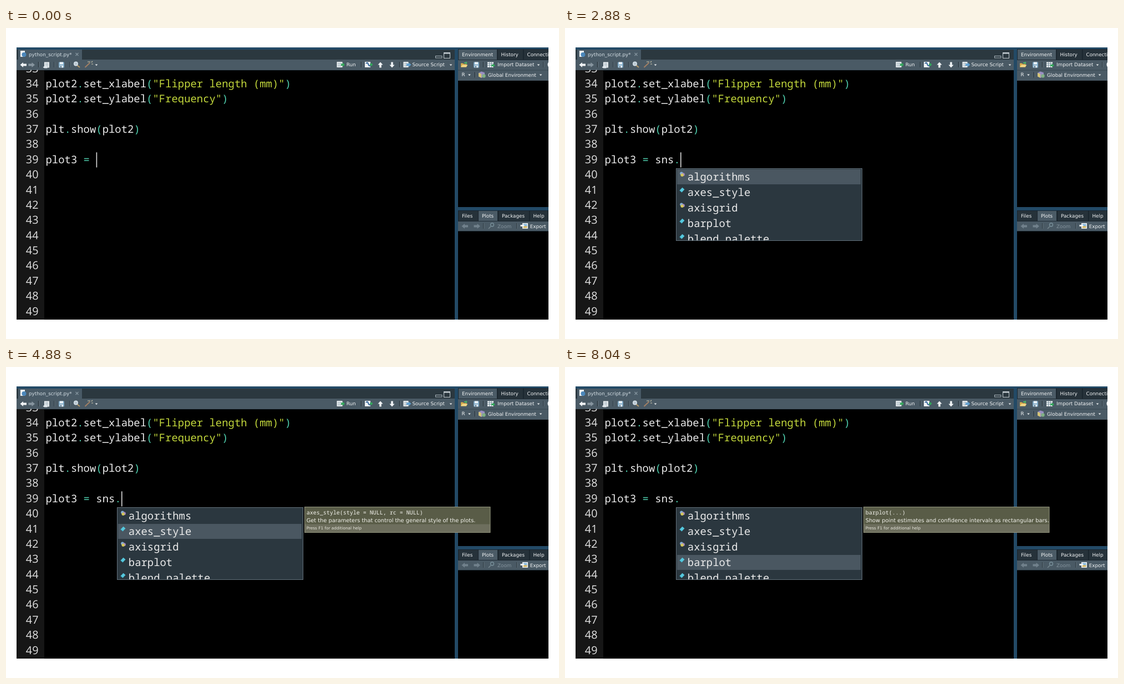
An HTML page that plays this animation: 997x561 px, repeating every 8560 ms.

```html
<!DOCTYPE html>
<html lang="en">
<head>
<meta charset="utf-8">
<title>Code completion</title>
<style>
html, body { margin: 0; width: 100%; height: 100%; overflow: hidden; background: #fff; }
svg { display: block; width: 997px; height: 561px; }
text { white-space: pre; text-rendering: geometricPrecision; }
.code { font: 18.92px "Noto Sans Mono", monospace; fill: #ececec; }
.num { font: 19.84px "Open Sans", sans-serif; fill: #e2e2e2; }
.ui { font: 8.8px "DejaVu Sans", sans-serif; fill: #f2f4f5; }
.tip { font: 9.8px "DejaVu Sans", sans-serif; fill: #f4f4ee; }
.tip .head { font-weight: bold; font-size: 10.5px; }
.tip .sig { font: 10px "Noto Sans Mono", monospace; }
.tip .foot { font-size: 7.32px; fill: #e6e6dc; }
</style>
</head>
<body>
<svg id="stage" viewBox="0 0 997 561" xmlns="http://www.w3.org/2000/svg"></svg>
<script>
const LOOP = 8560;
const PITCH = 11.35, LEFT = 71.5, ROW = 27.37, BASE = 107;
const stage = document.getElementById('stage');

const rect = (x, y, w, h, fill, extra = '') =>
  `<rect x="${x}" y="${y}" width="${w}" height="${h}" fill="${fill}" ${extra}/>`;
const path = (d, fill, extra = '') => `<path d="${d}" fill="${fill}" ${extra}/>`;
const line = (d, stroke, w = 1) => path(d, 'none', `stroke="${stroke}" stroke-width="${w}"`);
const dot = (x, y, r, fill) => `<circle cx="${x}" cy="${y}" r="${r}" fill="${fill}"/>`;
const text = (x, y, s, cls) => `<text x="${x}" y="${y}" class="${cls}">${s}</text>`;
const label = (x, y, s, fill = '#f2f4f5') =>
  `<text x="${x}" y="${y}" class="ui" style="fill:${fill}">${s}</text>`;
const lineY = n => BASE + (n - 34) * ROW;

// Strings are yellow-green, punctuation is teal
const paint = s => s.replace(/"[^"]*"|[().=]/g, m =>
  `<tspan fill="${m[0] === '"' ? '#c3d83c' : '#4fcfae'}">${m}</tspan>`);

// Toolbar icons, placed by their left edge and vertical centre
const sep = (x, y) => rect(x, y - 5, 1, 10, '#1c272e') + rect(x + 1, y - 5, 0.7, 10, '#73828c');
const caret = (x, y) => path(`M${x - 2.3} ${y - 1}h4.6l-2.3 2.8z`, '#e8ecee');
const arrow = (x, y, dir, fill) =>
  path(`M${x} ${y}l${5.5 * dir} -4.5v2.6h${6 * dir}v3.8h${-6 * dir}v2.6z`, fill);
const upDown = (x, y, dir, fill) =>
  path(`M${x} ${y - 5 * dir}l4.6 ${5 * dir}h-2.8v${5 * dir}h-3.6v${-5 * dir}h-2.8z`, fill);
const floppy = (x, y) => rect(x, y - 5, 10, 10, '#7fa9c6', 'rx="1"') +
  rect(x + 2, y - 5, 6, 4, '#eef5fa') + rect(x + 2, y + 1, 6, 4, '#e2ebf1') + rect(x + 3, y + 2, 2, 3, '#496b84');
const sheet = (x, y, w = 9) => rect(x, y - 5, w, 10, '#eef2f4') +
  [-2.5, 0, 2.5].map(d => rect(x + 1.5, y + d - 0.4, w - 3, 0.9, '#8298a6')).join('');
const lens = (x, y, ring, grip) => line(`M${x + 6} ${y + 1}l5 4`, grip, 2) +
  `<circle cx="${x + 4}" cy="${y - 1.5}" r="3.3" fill="${ring}" fill-opacity=".75" stroke="${ring}" stroke-width="1.2"/>`;
const blob = (x, y) => dot(x - 1, y - 1.8, 2.8, '#86b0d4') + dot(x + 2, y + 0.2, 2.9, '#a184c4') + dot(x + 0.2, y + 1.2, 2.7, '#d3c65c');
const tile = (x, y) => path(`M${x - 4.5} ${y + 1}l5 -5.2l4 3.4l-5 5.2z`, '#55c8dd') + line(`M${x - 4.5} ${y + 1}l4 3.4`, '#2f8ba4', 1);

function tab(x, y, w, s, active) {
  return rect(x, y, w, 19, active ? '#4b5b66' : '#26323a', 'stroke="#17212a" stroke-width=".8"') +
    label(x + 6.5, y + 12.3, s);
}

function editorPane() {
  const out = [
    rect(19, 39, 790, 18, '#2b383f'),
    rect(22, 39, 115, 19, '#495a66'),
    rect(19, 57, 790, 19.2, '#4a5a65'),
    rect(26, 41, 8, 11, '#f0f3f5'), dot(32.5, 48, 4, '#4b87bb'),
    label(41, 50.8, 'python_script.py*', '#d6e0e6'),
    line('M125.5 45l5 5m0 -5l-5 5', '#84949e', 1.3),
    rect(774.5, 50.5, 11.5, 3.5, '#2b383f', 'stroke="#aab5bc" stroke-width="1"'),
    rect(789.5, 44.5, 11, 10, '#2b383f', 'stroke="#c5ced3" stroke-width="1"'), rect(789.5, 44.5, 11, 2, '#c5ced3'),
    arrow(25.5, 66.5, 1, '#f1f4f6'), arrow(52, 66.5, -1, '#87959f'), sep(58, 66),
    sheet(69, 66.5), path('M66.5 71l5 -4.5v2.5h3v3.5h-5z', '#dfe7ec'), sep(86.5, 66),
    floppy(95, 66.5), sep(114.5, 66),
    lens(122, 66, '#e2edf5', '#b99a68'),
    line('M142.5 71l9 -8.5', '#a58064', 1.8),
    line('M147 61h5m2 1l2 -2m-2 5h3', '#cfc9ae', 1.1), caret(163, 66.5),
    sheet(596.5, 66, 10), path('M604 64.5h3v-2l4 3.8l-4 3.8v-2h-3z', '#35a85d'), label(613.8, 69, 'Run'),
    sep(640, 66),
    rect(647, 61, 10, 10, '#eef2f4'), line('M649 64q3 -3 4 1t4 3', '#2f5f96', 1.9),
    path('M656 64.5h2v-2l3.5 3.5l-3.5 3.5v-2h-2z', '#35a85d'),
    upDown(675, 66.5, 1, '#f1f4f6'), upDown(696, 66.5, -1, '#f1f4f6'), sep(709, 66),
    sheet(716.5, 66), path('M722 64.5h4v-2.3l4.5 4l-4.5 4v-2.3h-4z', '#5f9fd0'),
    label(732.5, 69, 'Source Script'), caret(802, 66.5),
    rect(19, 76.2, 790, 450, '#000'), rect(19, 76.2, 50, 450, '#161616')
  ];
  let rows = '';
  for (let n = 33; n < 50; n++) rows += text(35.8, lineY(n), n, 'num');
  const code = {
    34: 'plot2.set_xlabel("Flipper length (mm)")',
    35: 'plot2.set_ylabel("Frequency")',
    37: 'plt.show(plot2)'
  };
  for (const n in code) rows += text(LEFT, lineY(n), paint(code[n]), 'code');
  return out.join('') + `<g clip-path="url(#doc)">${rows}</g>`;
}

function sidePanes() {
  return [
    rect(815, 39, 163, 18, '#2b383f'), rect(815, 57, 163, 38, '#4a5a65'),
    rect(815, 75.7, 163, 0.8, '#33424c'), rect(815, 95, 163, 228, '#000'),
    tab(815.5, 38.5, 70, 'Environment', true), tab(886, 38.5, 46.5, 'History'), tab(933, 38.5, 60, 'Connections'),
    path('M820 70.5v-7h4l1.5 1.5h5v5.5z', '#d6a94c'), path('M820 70.5l3 -4h9.5l-3 4z', '#f2d889'),
    path('M826 62h3v-1.5l3 2.5l-3 2.5v-1.5h-3z', '#4db86a'),
    floppy(843, 66.5), sep(860, 66),
    rect(868, 61.5, 11, 9.5, '#eef2f4'),
    line('M868 64.5h11m-11 3.2h11m-7.3 -6.2v9.5m3.7 -9.5v9.5', '#6f8796', 0.9),
    path('M875 66h3v-1.8l4 3.3l-4 3.3v-1.8h-3z', '#35a85d'),
    label(886, 69, 'Import Dataset'), caret(960, 66.5), sep(968.5, 66),
    line('M979 61.5q-3.5 4.5 0 9', '#f1f4f6', 1.6),
    label(821.5, 87.3, 'R'), caret(835.5, 84.5), sep(845, 84.5),
    path('M852 81l5 -2.5l6 2v7l-6 2.5l-5 -2.5z', '#9a8fc4'), path('M852 81l5 1.8v7l-5 -2.3z', '#d5c477'),
    dot(861.5, 86.5, 3.2, '#7fb083'),
    label(869, 87.8, 'Global Environment'), caret(964, 84.5),
    rect(815, 329.5, 163, 19, '#2b383f'), rect(815, 348, 163, 18.5, '#4a5a65'), rect(815, 366.5, 163, 160, '#000'),
    tab(815.5, 329.5, 36, 'Files'), tab(851.5, 329.5, 35, 'Plots', true),
    tab(887.5, 329.5, 56, 'Packages'), tab(944, 329.5, 40, 'Help'),
    arrow(821.5, 357.5, 1, '#71818c'), arrow(855, 357.5, -1, '#71818c'), sep(860.5, 357),
    line('M870 362l4 -4', '#75858d', 1.6), `<circle cx="876.5" cy="355" r="3" fill="none" stroke="#78909a" stroke-width="1.3"/>`,
    label(886, 360.5, 'Zoom', '#84939d'), sep(920.5, 357),
    rect(931, 352, 10, 10, '#eef2f4'), rect(932.5, 353.5, 7, 4, '#86b7dc'), rect(932.5, 357.5, 7, 3, '#d2b257'),
    path('M927.5 355h3.5v-1.8l4 3.3l-4 3.3v-1.8h-3.5z', '#f4f7f8'),
    label(944.7, 360.5, 'Export')
  ].join('');
}

const items = ['algorithms', 'axes_style', 'axisgrid', 'barplot', 'blend_palette'];
function popup() {
  const rows = items.map((s, i) => {
    const y = 264 + i * 28;
    return (i === 0 || i === 2 ? blob : tile)(211, y) + text(220.8, y + 11.2, s, 'code');
  });
  return rect(200.5, 253.5, 335, 130, '#2b373f', 'stroke="#62707a" stroke-width="1"') +
    rect(202, 255, 331, 27, '#4a5761', 'id="pick"') +
    `<g clip-path="url(#list)">${rows.join('')}</g>`;
}

// Each tip: bottom edge, footer top, then [class, baseline, words]
const tips = [
  [307.5, 292, ['head', 266.3, 'algorithms'],
    ['', 277.8, 'Algorithms to support fitting routines in seaborn plotting'], ['', 289.3, 'functions.']],
  [298.5, 283.5, ['sig', 265.5, 'axes_style(style = NULL, rc = NULL)'],
    ['', 279.5, 'Get the parameters that control the general style of the plots.']],
  [285, 270, ['head', 266.3, 'axisgrid']],
  [298.5, 283.5, ['sig', 265.5, 'barplot(...)'],
    ['', 279.5, 'Show point estimates and confidence intervals as rectangular bars.']]
];
function tip([bottom, foot, ...rows], i) {
  return `<g class="tip" id="tip${i}">` +
    rect(538.5, 252.5, 334.5, bottom - 252.5, '#595c47') +
    rect(538.5, foot, 334.5, bottom - foot, '#6d6e5d') +
    rect(538.5, 252.5, 334.5, bottom - 252.5, 'none', 'stroke="#94967f" stroke-width="1"') +
    rows.map(([cls, y, s]) => text(541.7, y, s, cls)).join('') +
    text(541.7, foot + 9, 'Press F1 for additional help', 'foot') + '</g>';
}

stage.innerHTML = `<defs>
  <clipPath id="win">${rect(19, 35, 959, 491, '#000')}</clipPath>
  <clipPath id="doc">${rect(19, 75.5, 790, 451, '#000')}</clipPath>
  <clipPath id="list">${rect(201, 254, 334, 129, '#000')}</clipPath>
</defs>
<g clip-path="url(#win)">${rect(19, 35, 959, 491, '#234a66')}${editorPane()}${sidePanes()}
  <text id="typed" class="code" x="${LEFT}" y="${lineY(39)}"></text>
  ${rect(0, 224.3, 1.6, 27.2, '#dcdcdc', 'id="cursor"')}
  <g id="popup">${popup()}</g>${tips.map(tip).join('')}
</g>`;

const $ = id => document.getElementById(id);
const show = (el, on) => el.setAttribute('visibility', on ? 'visible' : 'hidden');
const typed = $('typed'), cursor = $('cursor'), list = $('popup'), pick = $('pick');
const tipEls = tips.map((_, i) => $('tip' + i));

const START = 'plot3 = ', KEYS = 'sns.';
const keyTimes = [720, 1360, 2000, 2560];
const pickTimes = [2880, 4880, 5600, 6400];
const TIP_AT = 3440;
const passed = (times, t) => times.filter(x => t >= x).length;

// Each keystroke restarts the blink: 560 ms on, 400 ms off
function cursorOn(t, count) {
  if (t >= 7920) return false;
  const since = count ? t - keyTimes[count - 1] : t + 80;
  return since % 960 < 560;
}

function draw(t) {
  const count = passed(keyTimes, t);
  const s = START + KEYS.slice(0, count);
  if (typed.dataset.s !== s) {
    typed.dataset.s = s;
    typed.innerHTML = paint(s);
  }
  cursor.setAttribute('x', LEFT + s.length * PITCH + 0.3);
  show(cursor, cursorOn(t, count));
  const row = passed(pickTimes, t) - 1;
  show(list, row >= 0);
  pick.setAttribute('y', 255 + Math.max(row, 0) * 28);
  tipEls.forEach((el, i) => show(el, i === row && t >= TIP_AT));
}

const begin = performance.now();
function tick() {
  draw((performance.now() - begin) % LOOP);
  requestAnimationFrame(tick);
}
draw(0);
requestAnimationFrame(tick);
</script>
</body>
</html>
```
